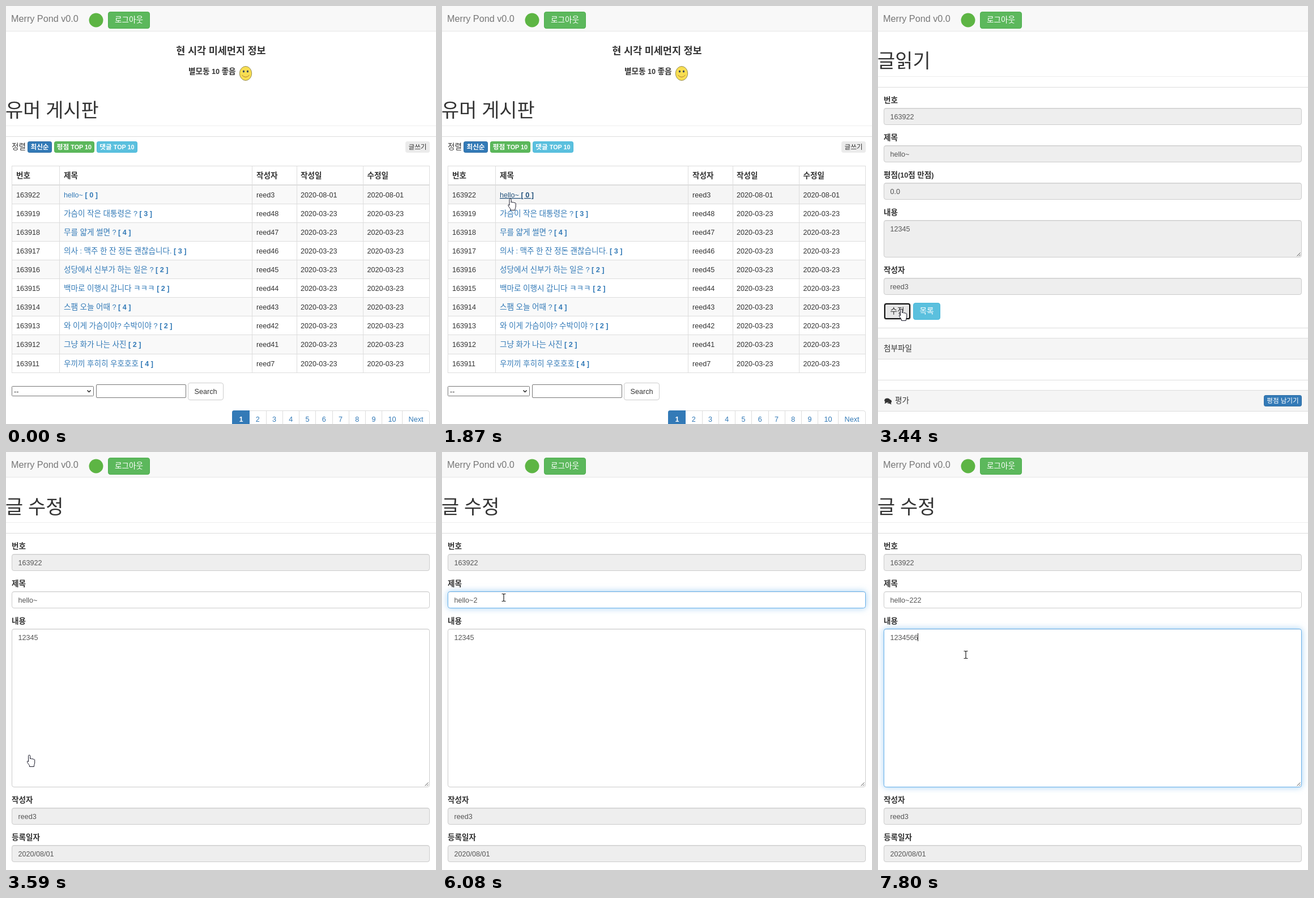
These frames come from a looping animation (759x738 px, 8 s). An HTML page:

```html
<!DOCTYPE html>
<html lang="ko">
<head>
<meta charset="utf-8">
<title>게시판</title>
<style>
html, body { margin: 0; width: 100%; height: 100%; overflow: hidden; background: #fff; }
svg { display: block; }
text { font: 12.6px "Liberation Sans", "Noto Sans CJK KR", "Noto Sans CJK", sans-serif; fill: #333; white-space: pre; }
.ko { font-size: 1.08em; }
.b { font-weight: 700; }
.brand { font-size: 16.2px; fill: #777; }
.h1 { font-size: 31.4px; font-weight: 350; }
.h4 { font-size: 16.2px; font-weight: 700; }
.xs { font-size: 10.8px; }
.mid { text-anchor: middle; }
.white { fill: #fff; }
.field { fill: #555; }
.a { fill: #337ab7; }
.menu { font: 12px "Noto Sans", sans-serif; }
.link .a { fill: #23527c; text-decoration: underline; }
.row.on rect { fill: #f5f5f5; }
.soft .edge { stroke: #a3c9e8; }
.focus .edge { stroke: #66afe9; filter: drop-shadow(0 0 6px rgba(102, 175, 233, .6)); }
.drop { filter: drop-shadow(0 1px 3px rgba(0, 0, 0, .35)); }
.hover rect { fill: #e6e6e6; stroke: #adadad; }
.press rect { fill: #e6e6e6; stroke: #ccc; }
.ring { display: none; }
.press .ring { display: inline; fill: #e6e6e6; stroke: #101010; }
</style>
</head>
<body>
<svg id="stage" width="759" height="738" viewBox="0 0 759 738"></svg>
<script>
const LOOP = 8000;
const BLUE = ['#337ab7', '#2e6da4'], GREEN = ['#5cb85c', '#4cae4c'], TEAL = ['#5bc0de', '#46b8da'];
const WRITER = 'reed3';

// drawing helpers
const text = (x, y, s, cls = '', id = '') =>
  `<text x="${x}" y="${y}" class="${cls}"${id && ` id="${id}"`}>` +
  s.replace(/[\u3131-\u318e\uac00-\ud7a3]+/g, '<tspan class="ko">$&</tspan>') + '</text>';
const fill = (x, y, w, h, color) =>
  `<rect x="${x}" y="${y}" width="${w}" height="${h}" fill="${color}"/>`;
const box = (x, y, r, b, bg, border, radius = 3.6, cls = '') =>
  `<rect class="${cls}" x="${x + .5}" y="${y + .5}" width="${r - x - 1}" height="${b - y - 1}" rx="${radius}" fill="${bg}" stroke="${border}"/>`;
const small = (x, r, y, label, [bg, border], cls) =>
  box(x, y, r, y + 20, bg, border, 2.7) + text((x + r) / 2, y + 14, label, 'xs mid ' + cls);
const group = (id, body, attrs = '') => `<g id="${id}" ${attrs}>${body}</g>`;
const grip = b => `<path d="M739.5 ${b - 2.5}l6-6M743 ${b - 2.5}l2.5-2.5" stroke="#555"/>`;
const field = (y, b, value, locked = true, id = '') =>
  box(10, y, 748, b, locked ? '#eee' : '#fff', '#ccc', 3.6, 'edge') +
  fill(12, y + 1, 734, 1, 'rgba(0,0,0,.06)') +
  text(21.5, y + 19.5, value, 'field', id) + (b - y > 40 ? grip(b) : '');
const label = (y, s) => text(10, y, s, 'b');
const heading = (y, s) =>
  text(-1, y, s, 'h1') + fill(0, y + 15, 759, 1, '#eee') + fill(0, y + 34, 759, 1, '#ddd');

const navbar = fill(0, 0, 759, 45, '#f8f8f8') + fill(0, 44, 759, 1, '#e7e7e7') +
  text(9, 28, 'Merry Pond v0.0', 'brand') +
  '<circle cx="159" cy="25" r="12.5" fill="#5db544"/>' +
  box(180, 10, 254, 40, ...GREEN) + text(217, 29, '로그아웃', 'white mid');

// list page
const posts = [
  ['hello~', 0], ['가슴이 작은 대통령은 ?', 3], ['무를 얇게 썰면 ?', 4],
  ['의사 : 맥주 한 잔 정돈 괜찮습니다.', 3], ['성당에서 신부가 하는 일은 ?', 2],
  ['백마로 이행시 갑니다 ㅋㅋㅋ', 2], ['스팸 오늘 어때 ?', 4],
  ['와 이게 가슴이야? 수박이야 ?', 2], ['그냥 화가 나는 사진', 2], ['우끼끼 후히히 우호호호', 4]
];
const rowTop = i => Math.round(316.6 + 33.1 * i);
const columns = [18, 102, 442, 520, 637.5];

const postRow = ([title, count], i) => {
  const y = rowTop(i) + 21;
  const date = i ? '2020-03-23' : '2020-08-01';
  const writer = !i ? WRITER : i < 9 ? 'reed' + (49 - i) : 'reed7';
  const cells = [String(i ? 163920 - i : 163922), '', writer, date, date];
  return `<g class="row">${fill(10, rowTop(i), 738, 33, i % 2 ? '#fff' : '#f9f9f9')}` +
    cells.map((c, n) => c && text(columns[n], y, c)).join('') +
    text(102, y, `${title} <tspan class="b">[ ${count} ]</tspan>`, 'a') + '</g>';
};

const smiley = `<ellipse cx="423" cy="119" rx="10.7" ry="12.5" fill="#f8de52" stroke="#8d8550" stroke-width=".9"/>
  <ellipse cx="419.5" cy="115.5" rx="1.6" ry="1.9" fill="#3d4a5c"/><ellipse cx="426.5" cy="115.5" rx="1.6" ry="1.9" fill="#3d4a5c"/>
  <path d="M416.5 122q6.5 7 13 0" fill="none" stroke="#b07a33"/>`;

const pageBar = () => {
  const edge = n => n < 10 ? 400 + 29.25 * n : n < 11 ? 699 : 747;
  let out = box(399, 714, 748, 750, '#fff', '#ddd');
  for (let n = 1; n < 11; n++) out += fill(Math.round(edge(n)), 714, 1, 24, '#ddd');
  out += '<path d="M399 738V717.6a3.6 3.6 0 0 1 3.6-3.6H430V738z" fill="#337ab7"/>';
  for (let n = 0; n < 11; n++)
    out += text((edge(n) + edge(n + 1)) / 2 + .5, 734, n < 10 ? String(n + 1) : 'Next', n ? 'a mid' : 'white b mid');
  return out;
};

const listPage = text(379.5, 85, '현 시각 미세먼지 정보', 'h4 mid') +
  text(322, 119.5, '별모동 10 좋음', 'b') + smiley + heading(196, '유머 게시판') +
  text(10, 252.5, '정렬') + small(38, 81, 239, '최신순', BLUE, 'white b') +
  small(85, 156, 239, '평점 TOP 10', GREEN, 'white b') + small(160, 232, 239, '댓글 TOP 10', TEAL, 'white b') +
  small(705, 748, 239, '글쓰기', ['#ebebeb', '#ebebeb'], '') +
  posts.map(postRow).join('') +
  ['번호', '제목', '작성자', '작성일', '수정일'].map((s, n) => text(columns[n], 303.5, s, 'b')).join('') +
  fill(10, 282, 738, 1, '#ddd') + fill(10, 315, 738, 2, '#ddd') +
  posts.map((p, i) => fill(10, rowTop(i + 1) - 1, 738, 1, '#ddd')).join('') +
  [10, 94, 434, 513, 630, 747].map(x => fill(x, 282, 1, 365, '#ddd')).join('') +
  box(10, 671, 155, 689, '#fff', '#767676', 1) + text(14, 684.5, '--') +
  '<path d="M143.5 678.5l3 3 3-3" fill="none" stroke="#222" stroke-width="1.5"/>' +
  box(159, 668, 318, 692, '#fff', '#767676', 1.5) +
  box(321, 665, 384, 696, '#fff', '#ccc') + text(352.5, 685, 'Search', 'mid') + pageBar();

// reading page
const panel = (y, s, x) => fill(0, y, 759, 38, '#ddd') + fill(0, y + 1, 759, 36, '#f5f5f5') + text(x, y + 23, s);

const readPage = heading(109, '글읽기') +
  label(170.5, '번호') + field(180, 210, '163922') +
  label(236.5, '제목') + field(246, 276, 'hello~') +
  label(302.5, '평점(10점 만점)') + field(312, 342, '0.0') +
  label(368.5, '내용') + field(378, 444, '12345') +
  label(470.5, '작성자') + field(480, 510, WRITER) +
  group('modify', box(10, 524, 58, 554, '#fff', '#ccc') +
    '<rect class="ring" x="12" y="526" width="44" height="26" rx="2.5" stroke-width="2"/>' +
    text(34, 543, '수정', 'mid')) +
  box(62, 524, 110, 554, ...TEAL) + text(86, 543, '목록', 'white mid') +
  fill(0, 568, 759, 1, '#ddd') + panel(586, '첨부파일', 10) +
  fill(0, 660, 759, 1, '#ddd') + panel(678, '평가', 30) +
  `<path d="M20 694.5c5 1 5 5 2.5 6.5l1.5 2.2q-3 0-4-1.4-2.500.3-4-.8 5-1 4-6.500z" fill="#333"/>
   <ellipse cx="16.3" cy="696.3" rx="5" ry="3.8" fill="#333"/><path d="M13 698l-1.500 4q3-.5 4.500-2.500z" fill="#333"/>` +
  small(681, 748, 687, '평점 남기기', BLUE, 'white');

// edit page
const editPage = heading(109, '글 수정') +
  label(170.5, '번호') + field(180, 210, '163922') +
  label(236.5, '제목') + group('title', field(246, 276, '', false, 'titleText')) +
  label(302.5, '내용') + group('body', field(312, 592, '', false, 'bodyText')) +
  label(618.5, '작성자') + field(628, 658, WRITER) +
  label(684.5, '등록일자') + field(694, 724, '2020/08/01') +
  group('menu', '<rect class="drop" x="10" y="277" width="171.5" height="79" rx="2" fill="#fff"/>' +
    text(20.5, 304.5, 'hello~2', 'menu') + text(20.5, 336.5, 'hello~', 'menu')) +
  '<rect id="caret" width="1" height="14" fill="#222"/>';

const pointers =
  '<circle id="click" r="10.5" fill="#ffe81a" opacity=".8"/>' +
  group('hand', '<path d="M-2 12V1.700a1.600 1.600 0 0 1 3.200 0V7c0-1.400 2.800-1.200 2.800.3c.3-1.200 2.700-.9 2.700.6c.3-1 2.500-.6 2.500.9V14c0 2-1.300 3-1.300 5v1.500H0V19c-.6-2-3.300-4.500-4-6.500c-.6-1.800.8-2.400 2-.5z"/>', 'fill="#fff" stroke="#1b1b2b"') +
  group('arrow', '<path d="M0 0V16l3.700-3.500 2.400 5.600 2.200-1-2.400-5.400H11z"/>', 'fill="#fff" stroke="#111"') +
  group('beam', '<path d="M-3.500-6.500H-1L0-5.500 1-6.500H3.500M0-5.500V5.500M-3.500 6.500H-1L0 5.500 1 6.500H3.500"/>', 'fill="none" stroke="#222" stroke-width="1.200"');

document.getElementById('stage').innerHTML = navbar + group('list', listPage) +
  group('read', readPage) + group('edit', editPage) + pointers;

const $ = id => document.getElementById(id);
const show = (id, on) => $(id).style.display = on ? '' : 'none';
const within = (v, a, b) => v >= a && v < b;
const rows = document.querySelectorAll('.row');

// pointer travel: begin, end, steps, destination
const moves = [
  [300, 1080, 11, 121, 340],
  [2630, 3270, 9, 41.5, 535],
  [3900, 4370, 7, 109, 257],
  [6700, 6940, 4, 155, 358]
];
const ease = p => (1 - Math.cos(Math.PI * p)) / 2;

function pointerAt(t) {
  let x = 180, y = 625;
  for (const [begin, end, steps, tx, ty] of moves) {
    if (t < begin) break;
    const k = Math.floor((t - begin) * (steps - 1) / (end - begin) + 1e-6);
    const p = ease(Math.min(1, begin === 300 ? k / (steps - 1) : (k + 1) / steps));
    x += (tx - x) * p;
    y += (ty - y) * p;
  }
  return [x, y];
}

function pointerKind(t, y, onLink) {
  if (t < 2100) return onLink ? 'hand' : 'arrow';
  if (t < 2630 || within(t, 3270, 3900)) return 'hand';
  const inputs = t < 3590
    ? [[180, 210], [246, 276], [312, 342], [378, 444], [480, 510]]
    : [[246, 276], [312, 592]];
  if (t < 3590 && y > 524) return 'hand';
  return inputs.some(([a, b]) => within(y, a, b)) ? 'beam' : 'arrow';
}

const typed = (t, base, keys) => base + keys.filter(([at]) => t >= at).map(k => k[1]).join('');

function draw(t) {
  const [x, y] = pointerAt(t);
  show('list', t < 2100);
  show('read', within(t, 2100, 3590));
  show('edit', t >= 3590);

  let onLink = false;
  rows.forEach((row, i) => {
    const top = rowTop(i);
    const on = t >= 300 && within(y, top, top + 33);
    const link = on && Math.abs(y - top - 16.5) < 8;
    row.classList.toggle('on', on);
    row.classList.toggle('link', link);
    onLink = onLink || link;
  });

  $('modify').setAttribute('class', t >= 3440 ? 'press' : t >= 3270 ? 'hover' : '');

  const title = typed(t, 'hello~', [[5530, '2'], [6230, '2'], [6480, '2']]);
  const body = typed(t, '12345', [[7570, '6'], [7800, '6']]);
  $('titleText').textContent = title;
  $('bodyText').textContent = body;
  $('title').setAttribute('class', within(t, 4520, 4610) ? 'soft' : within(t, 4610, 6940) ? 'focus' : '');
  $('body').setAttribute('class', within(t, 6940, 7020) ? 'soft' : t >= 7020 ? 'focus' : '');
  show('menu', within(t, 4520, 5530));

  const inBody = t >= 6940;
  $('caret').setAttribute('x', inBody ? 56 + 7 * (body.length - 5) : 55 + 7 * (title.length - 6));
  $('caret').setAttribute('y', inBody ? 320 : 254);
  show('caret', [[4520, 5070], [5530, 6080], [6230, 7400], [7570, LOOP]].some(([a, b]) => within(t, a, b)));

  const kind = pointerKind(t, y, onLink);
  for (const id of ['hand', 'arrow', 'beam']) {
    show(id, t >= 300 && id === kind);
    $(id).setAttribute('transform', `translate(${x} ${y})`);
  }
  $('click').setAttribute('cx', x - 1);
  $('click').setAttribute('cy', y - .5);
  show('click', [1780, 4520, 6940].some(at => within(t, at, at + 90)));
}

const start = performance.now();
function tick() {
  draw((performance.now() - start) % LOOP);
  requestAnimationFrame(tick);
}
tick();
</script>
</body>
</html>
```
